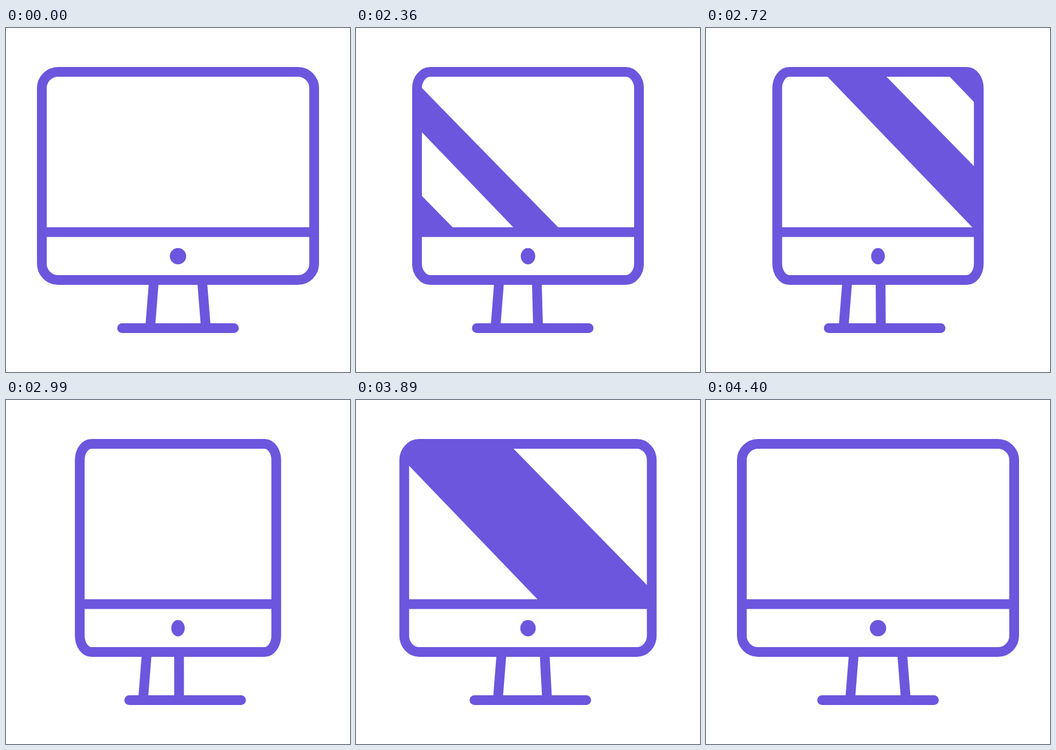
These frames come from a looping animation (600 px wide and 600 px high, 4.43 s). An HTML page with a canvas:

```html
<!DOCTYPE html>
<html lang="en">
<head>
<meta charset="utf-8">
<title>Turning monitor</title>
<style>
  html, body { margin: 0; width: 100%; height: 100%; overflow: hidden; background: #fff; }
  canvas { display: block; width: 600px; height: 600px; }
</style>
</head>
<body>
<canvas id="stage" width="600" height="600"></canvas>
<script>
const ctx = document.getElementById('stage').getContext('2d');
const LOOP = 4430, STEP = 30;
const COLOR = '#6c56de';
const TOP = 76.5, BOTTOM = 439.5, BAR = 356, MID = 216;
const SPEED = 1.12; // glare, px per ms

// Each glare pass: a moment and the [trailing, leading] edges at mid-screen height.
const GLARE = [
  { at: 2570, bands: [[170, 275], [383, 459]] },
  { at: 3890, bands: [[190, 403]] }
];

function bezier(x1, y1, x2, y2) {
  const curve = (a, b, u) => 3 * (1 - u) ** 2 * u * a + 3 * (1 - u) * u * u * b + u ** 3;
  return x => {
    if (x <= 0) return 0;
    if (x >= 1) return 1;
    let lo = 0, hi = 1;
    for (let i = 0; i < 30; i++) {
      const u = (lo + hi) / 2;
      if (curve(x1, x2, u) < x) lo = u; else hi = u;
    }
    return curve(y1, y2, lo);
  };
}

const turnAway = bezier(0.2, 0, 0.05, 1);
const turnBack = bezier(0.6, 0, 0.4, 1);
const turnAt = t => turnAway((t - 2000) / 1200) - turnBack((t - 3200) / 1200);

function line(x1, y1, x2, y2, cap = 'butt') {
  ctx.lineCap = cap;
  ctx.beginPath();
  ctx.moveTo(x1, y1);
  ctx.lineTo(x2, y2);
  ctx.stroke();
}

function casePath(half) {
  ctx.beginPath();
  ctx.roundRect(300 - half, TOP, half * 2, BOTTOM - TOP, { x: 28.5 * half / 237.5, y: 28.5 });
}

function band(back, front) {
  const edge = (x, slope, y) => ctx.lineTo(x + (y - MID) / slope, y);
  ctx.beginPath();
  edge(back, 1.04, TOP);
  edge(front, 1.022, TOP);
  edge(front, 1.022, BAR);
  edge(back, 1.04, BAR);
  ctx.fill();
}

function drawGlare(t, half) {
  ctx.save();
  casePath(half);
  ctx.clip();
  for (const { at, bands } of GLARE) {
    const shift = (t - at) * SPEED;
    for (const [back, front] of bands) band(back + shift, front + shift);
  }
  ctx.restore();
}

function draw(t) {
  const turn = turnAt(t);
  const half = 237.5 - 67 * turn;
  const left = -12.5 * turn, base = 12.6 * turn;

  ctx.fillStyle = '#fff';
  ctx.fillRect(0, 0, 600, 600);
  ctx.fillStyle = ctx.strokeStyle = COLOR;
  ctx.lineWidth = 17;

  line(258 + left, 440, 251.4 + left, 523.5);
  line(342 - 40.7 * turn, 440, 348.6 - 47.3 * turn, 523.5);
  line(202.5 + base, 523.5, 397.5 + base, 523.5, 'round');

  drawGlare(t, half);
  casePath(half);
  ctx.stroke();
  line(300 - half, BAR, 300 + half, BAR);

  ctx.beginPath();
  ctx.ellipse(300, 398, 14.3 - 2.6 * turn, 14.3, 0, 0, Math.PI * 2);
  ctx.fill();
}

function tick() {
  const t = performance.now() % LOOP;
  draw(Math.floor((t + 10) / STEP) * STEP - 10);
  requestAnimationFrame(tick);
}
tick();
</script>
</body>
</html>
```
